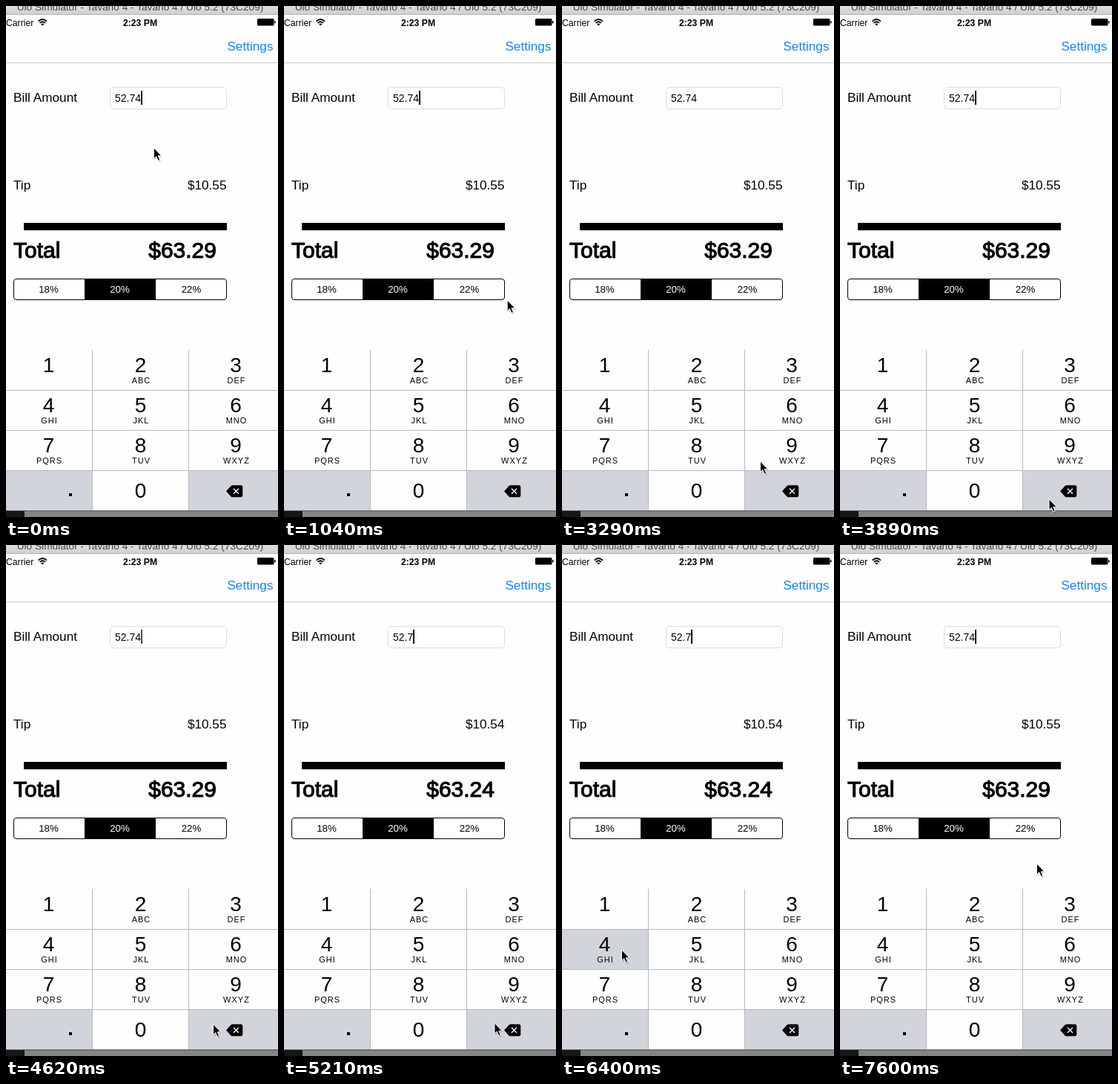
Recreate the animation shown at these times as an HTML page. Size 367 px wide and 688 px high, loop 8000 ms.

```html
<!DOCTYPE html>
<html lang="en">
<head>
<meta charset="utf-8">
<title>Tip calculator</title>
<style>
html, body { margin: 0; width: 100%; height: 100%; overflow: hidden; background: #fff; }
svg { display: block; width: 367px; height: 688px; font: 17.2px "Liberation Sans", Arial, sans-serif; }
.mid { text-anchor: middle; }
.end { text-anchor: end; }
.small { font-size: 12.2px; }
.total { font-size: 30px; stroke: #000; stroke-width: 1.1px; }
.seg { font-size: 13.3px; text-anchor: middle; }
.digit { font-size: 28px; text-anchor: middle; }
.letters { font-size: 11px; letter-spacing: 1px; text-anchor: middle; }
</style>
</head>
<body>
<svg viewBox="0 0 367 688">
  <defs>
    <linearGradient id="bar" x2="0" y2="1">
      <stop stop-color="#dedede"/><stop offset="1" stop-color="#d0d0d0"/>
    </linearGradient>
  </defs>
  <rect width="367" height="688" fill="#fefefe"/>
  <rect width="367" height="11" fill="url(#bar)"/>
  <path d="M0 11.5H367" stroke="#b5b5b5"/>
  <text class="mid" x="181" y="6" font-size="13.7" fill="#444">Ulo Simulator - Tavano 4 - Tavano 4 / Ulo 5.2 (73C209)</text>

  <!-- status and navigation bars -->
  <text class="small" y="27">Carrier</text>
  <g fill="none" stroke="#000" stroke-width="1.7">
    <path d="M43.6 20.6Q49.3 15.4 55 20.6M45.6 22.9Q49.3 19.6 53 22.9"/>
    <path d="M47.2 24.4Q49.3 22.6 51.4 24.4L49.3 26.6Z" fill="#000" stroke="none"/>
  </g>
  <text class="small mid" x="181" y="27" font-weight="bold">2:23 PM</text>
  <rect x="339" y="17" width="22.5" height="9.5" rx="1.5"/>
  <rect x="362" y="20" width="1.6" height="3.5" rx=".8"/>
  <text class="end" x="360.5" y="60" fill="#1583ff">Settings</text>
  <path d="M0 76.5H367" stroke="#c9c9c9"/>

  <!-- form -->
  <text x="10" y="129">Bill Amount</text>
  <rect x="140.5" y="109.5" width="157" height="29" rx="4.5" fill="#fff" stroke="#dcdcdc"/>
  <text id="bill" x="147" y="129" font-size="14"></text>
  <rect id="caret" y="114" width="2" height="19"/>
  <text x="10" y="247">Tip</text>
  <text id="tip" class="end" x="297.5" y="247"></text>
  <rect x="24" y="292" width="274" height="10"/>
  <text class="total" x="10" y="339">Total</text>
  <text id="total" class="total end" x="284" y="339"></text>
  <rect x="10.5" y="367.5" width="287" height="28" rx="3.5" fill="#fff" stroke="#000"/>
  <path d="M106 367H202V396H106Z"/>
  <text class="seg" x="57.5" y="386">18%</text>
  <text class="seg" x="153.5" y="386" fill="#fff">20%</text>
  <text class="seg" x="250" y="386">22%</text>

  <!-- keypad -->
  <rect y="626" width="116" height="53" fill="#d1d5db"/>
  <rect id="del" x="247" y="626" width="120" height="53"/>
  <rect id="four" y="518" width="116" height="53"/>
  <path d="M116.5 463V679M246.5 463V679M0 517.5H367M0 571.5H367M0 625.5H367" stroke="#b7b9bd"/>
  <g id="keys"></g>
  <rect x="85" y="656" width="4" height="4"/>
  <path d="M297 653.3L303.5 646.2Q304.5 645.3 306 645.3H317Q319.3 645.3 319.3 647.5V659Q319.3 661.3 317 661.3H306Q304.5 661.3 303.5 660.4Z"/>
  <path d="M307 649.8L314 656.8M314 649.8L307 656.8" stroke="#fff" stroke-width="1.4"/>
  <rect y="679" width="367" height="9" fill="#858585"/>
  <rect y="679" width="367" height="1.5" fill="#6a6a6a"/>
  <rect y="680" width="25" height="8" fill="#161616"/>

  <g id="mouse">
    <path d="M1 2V16.5L4.3 13.4L7 19L9.4 18L7 12.6H11.5Z" opacity=".22"/>
    <path d="M0 0V14.6L3.3 11.5L5.7 17.3L8.2 16.2L5.8 10.7H10.4Z" stroke="#fff"/>
  </g>
</svg>
<script>
const $ = id => document.getElementById(id);
const LOOP = 8000, TICK = 149, LAST = 51;
const DELETED = 5210, TYPED = 6545;

// time, x, y of the pointer tip
const path = [
  [0, 199.5, 191], [600, 314, 345], [1190, 297, 413], [1800, 270, 438], [2240, 264.5, 440],
  [2390, 265, 440], [2840, 272, 441], [3000, 272, 441], [3278, 267.5, 613],
  [3700, 282, 669], [4180, 282, 655], [4619, 279.5, 645], [5060, 284, 645],
  [5360, 284, 642], [5662, 224.5, 636], [6200, 80.5, 545], [6407, 80.5, 545],
  [6556, 190, 458], [7150, 265.5, 429], [LOOP, 265.5, 429]
];

function pointer(t) {
  const i = path.findIndex(p => p[0] > t);
  const [t0, x0, y0] = path[i - 1], [t1, x1, y1] = path[i];
  const k = (t - t0) / (t1 - t0);
  return [x0 + (x1 - x0) * k, y0 + (y1 - y0) * k];
}

// the blink restarts with every edit
function caretAlpha(t) {
  const start = t >= TYPED ? TYPED : t >= DELETED ? DELETED : -300;
  const d = (t - start) % 1000;
  const a = d < 700 ? (560 - d) / 60 : (d - 905) / 20;
  return Math.max(0, Math.min(1, a));
}

const letters = ["", "ABC", "DEF", "GHI", "JKL", "MNO", "PQRS", "TUV", "WXYZ"];
const columns = [57.5, 181.5, 310];
$("keys").innerHTML = letters.map((s, i) => {
  const x = columns[i % 3], y = 493 + 54 * Math.floor(i / 3);
  return `<text class="digit" x="${x}" y="${y}">${i + 1}</text>
    <text class="letters" x="${x + 1}" y="${y + 15}">${s}</text>`;
}).join("") + '<text class="digit" x="181.5" y="662">0</text>';

function draw(now) {
  const t = Math.min(LAST, Math.floor((now % LOOP + 10) / TICK)) * TICK;
  const short = t >= DELETED && t < TYPED;
  $("bill").textContent = short ? "52.7" : "52.74";
  $("tip").textContent = short ? "$10.54" : "$10.55";
  $("total").textContent = short ? "$63.24" : "$63.29";
  $("caret").setAttribute("x", short ? 174 : 182);
  $("caret").setAttribute("opacity", caretAlpha(t));
  $("del").setAttribute("fill", t > 5050 && t < DELETED ? "#fff" : "#d1d5db");
  $("four").setAttribute("fill", t > 6250 && t < TYPED ? "#d1d5db" : "#fefefe");
  $("mouse").setAttribute("transform", `translate(${pointer(t)})`);
}

const begin = performance.now();
function loop() {
  draw(performance.now() - begin);
  requestAnimationFrame(loop);
}
loop();
</script>
</body>
</html>
```
